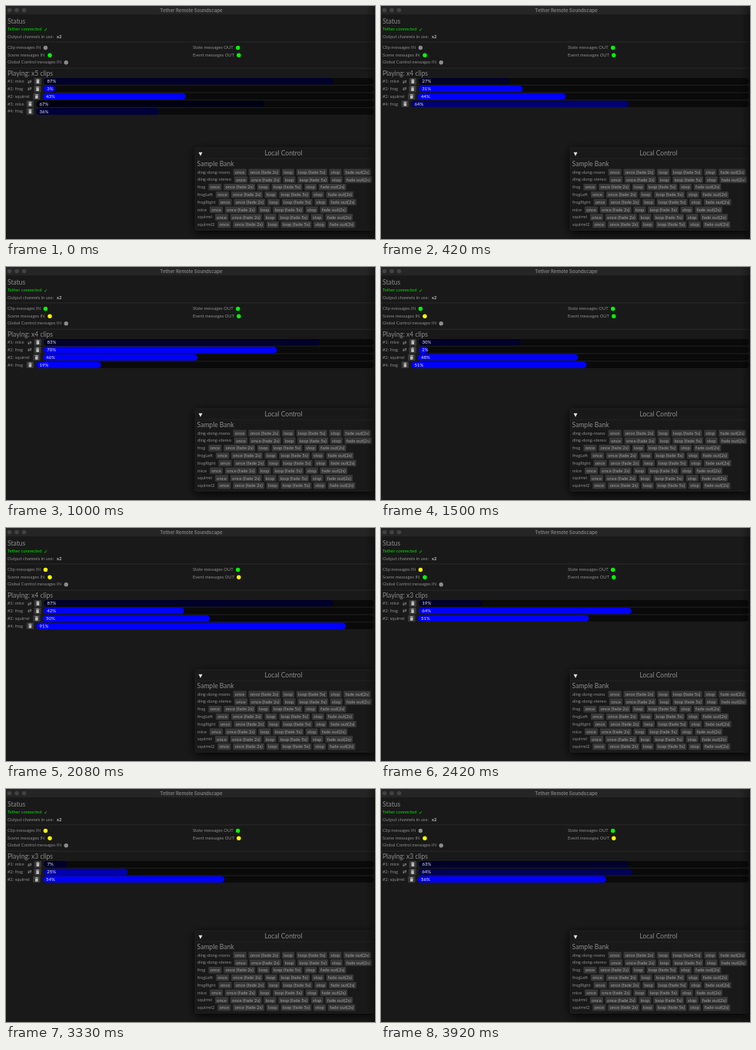
An HTML page with a canvas for the animation above (4010 ms loop, 480 by 304 pixels).

```html
<!DOCTYPE html>
<html lang="en">
<head>
<meta charset="utf-8">
<title>Tether Remote Soundscape</title>
<style>
  html, body { margin: 0; height: 100%; overflow: hidden; background: #191919; }
  canvas { display: block; }
</style>
</head>
<body>
<canvas id="stage" width="480" height="304"></canvas>
<script>
const ctx = document.getElementById('stage').getContext('2d');
const LOOP = 4010, TICKS = 48, TICKS_PER_MS = 0.012;
const ROW = 9.8, BAR_END = 478.7;
const BODY = '6px Lato, sans-serif', LABEL = '5.8px Lato, sans-serif';
const HEADING = '8.5px Lato, sans-serif', SYMBOL = '6.5px "DejaVu Sans", sans-serif';
const BACK = '#191919', BUTTON = '#383838', EDGE = '#2a2a2a', RULE = '#363636', DIM = '#8c8c8c';
const GREY = '#8c8c8c', GREEN = '#0f0', YELLOW = '#ff0';

// keys: [tick, percent], unwrapped for looping clips; blue: brightness at a tick
const clips = [
  { name: '#1: mice', x: 49.3, loop: true, blue: () => 42,
    keys: [[0, 87.7], [5, 127.8], [12, 183.6], [18, 230.8], [25, 287.6], [34, 358.5], [47, 463.6]] },
  { name: '#2: frog', x: 49, loop: true, blue: k => 255 - Math.max(0, k - 34) * 13,
    keys: [[0, 3.4], [5, 31.5], [12, 70.6], [18, 102.8], [25, 142.5], [34, 191.8], [47, 264.7]] },
  { name: '#2: squirrel', x: 47.7, blue: () => 255, keys: [[0, 43.2], [47, 56.9]] },
  { name: '#3: mice', x: 39.3, blue: () => 20, keys: [[0, 67.6], [4, 99.6]] },
  { name: '#4: frog', x: 39.3, blue: k => 58 + k * 11, keys: [[0, 36.4], [5, 64.4]] },
  { name: '#4: frog', x: 39.3, blue: () => 255, keys: [[9, 2.6], [12, 19.2], [18, 51.9], [25, 91.7]] }
];

const lights = [
  { text: 'Clip messages IN', x: 2, y: 54.5, dot: 51.4, steps: [[0, GREY], [10, GREEN], [20, YELLOW], [44, GREY]] },
  { text: 'Scene messages IN', x: 2, y: 64.2, dot: 57, steps: [[0, GREEN], [10, YELLOW], [26, GREEN], [38, YELLOW]] },
  { text: 'Global Control messages IN', x: 2, y: 73.8, dot: 78.2, steps: [[0, GREY]] },
  { text: 'State messages OUT', x: 243, y: 54.5, dot: 301.7, steps: [[0, GREEN]] },
  { text: 'Event messages OUT', x: 243, y: 64.2, dot: 302.8, steps: [[0, GREEN], [23, YELLOW], [27, GREEN], [38, YELLOW]] }
];

const samples = ['ding-dong-mono', 'ding-dong-stereo', 'frog', 'frogLeft', 'frogRight', 'mice', 'squirrel', 'squirrel2'];
const actions = ['once', 'once (fade 2s)', 'loop', 'loop (fade 5s)', 'stop', 'fade out(2s)'];

// Draws text centred vertically on y and returns its width.
function text(str, x, y, color = DIM, font = LABEL, align = 'left') {
  ctx.font = font;
  ctx.fillStyle = color;
  ctx.textAlign = align;
  ctx.fillText(str, x, y + parseFloat(font.match(/[\d.]+px/)[0]) * 0.34);
  return ctx.measureText(str).width;
}

function box(x, y, w, h, radius, fill) {
  ctx.beginPath();
  ctx.roundRect(x, y, w, h, radius);
  ctx.fillStyle = fill;
  ctx.fill();
}

function dot(x, y, r, fill) {
  box(x - r, y - r, 2 * r, 2 * r, r, fill);
}

function line(y, color = RULE, x = 0, end = 480) {
  ctx.fillStyle = color;
  ctx.fillRect(x, y, end - x, 0.6);
}

function progress({ keys }, tick) {
  let i = 1;
  while (i < keys.length - 1 && keys[i][0] <= tick) i++;
  const [t0, v0] = keys[i - 1], [t1, v1] = keys[i];
  return v0 + (v1 - v0) * (tick - t0) / (t1 - t0);
}

function drawTrash(x, y) {
  box(x, y - 4.4, 9.4, 8.8, 1, BUTTON);
  box(x + 2.5, y - 2.4, 4.4, 0.8, 0, '#c8c8c8');
  box(x + 3.9, y - 3, 1.6, 0.7, 0, '#c8c8c8');
  box(x + 2.9, y - 1.2, 3.6, 4, 0.5, '#bebebe');
}

function drawClip(clip, y, tick) {
  const value = progress(clip, tick) % 100, width = BAR_END - clip.x;
  text(clip.name, 2, y);
  if (clip.loop) text('⇄', 28, y, '#a0a0a0', SYMBOL);
  drawTrash(clip.x - 12.6, y);
  box(clip.x, y - 4.2, width, 8.4, 4.2, '#0a0a0a');
  box(clip.x, y - 4.2, Math.max(8.4, width * value / 100), 8.4, 4.2, `rgb(0 0 ${clip.blue(tick)})`);
  text(Math.floor(value) + '%', clip.x + 4.3, y, '#f0f0f0', BODY);
}

function drawStatus(tick) {
  text('Status', 2, 20, DIM, HEADING);
  const width = text('Tether connected', 2, 30.5, '#00e000');
  text('✓', 4.5 + width, 30.5, '#00e000', SYMBOL);
  text('Output channels in use:', 2, 40.3);
  text('x2', 66, 40.3, '#f0f0f0', BODY);
  line(46.6);
  for (const { text: label, x, y, dot: dotX, steps } of lights) {
    text(label, x, y - 0.3);
    dot(dotX, y, 2.7, steps.findLast(step => step[0] <= tick)[1]);
  }
  line(80.8);
}

function drawTitleBar() {
  box(0, 0, 480, 11, 0, '#252525');
  for (const x of [4.5, 14, 23.5]) dot(x, 5.5, 2.8, '#424242');
  text('Tether Remote Soundscape', 241, 5.5, '#808080', '600 6.1px Inter, sans-serif', 'center');
}

function drawPanel() {
  ctx.save();
  ctx.shadowColor = '#000';
  ctx.shadowBlur = 14;
  ctx.shadowOffsetY = 3;
  box(246, 185, 232, 107.5, 3, BACK);
  ctx.restore();
  ctx.strokeStyle = EDGE;
  ctx.lineWidth = 0.6;
  ctx.stroke();
  line(198.8, EDGE, 246, 478);
  text('▼', 250.5, 192.3, '#e0e0e0', SYMBOL);
  text('Local Control', 361, 192.3, DIM, HEADING, 'center');
  text('Sample Bank', 248.6, 206.5, DIM, HEADING);
  samples.forEach((name, i) => {
    const y = 216.7 + i * ROW;
    let x = 255.2 + text(name, 249, y);
    for (const action of actions) {
      ctx.font = BODY;
      box(x - 2.2, y - 4.2, ctx.measureText(action).width + 4.4, 8.4, 1, BUTTON);
      x += text(action, x, y, '#a4a4a4', BODY) + 7.2;
    }
  });
}

function draw(tick) {
  ctx.fillStyle = BACK;
  ctx.fillRect(0, 0, 480, 304);
  drawTitleBar();
  drawStatus(tick);
  const playing = clips.filter(clip =>
    tick >= clip.keys[0][0] && (clip.loop || progress(clip, tick) < 100));
  text(`Playing: x${playing.length} clips`, 2, 87.8, DIM, HEADING);
  playing.forEach((clip, i) => drawClip(clip, 98.3 + i * ROW, tick));
  drawPanel();
  const shade = ctx.createLinearGradient(468, 0, 480, 0);
  shade.addColorStop(0, '#0000');
  shade.addColorStop(1, '#0005');
  ctx.fillStyle = shade;
  ctx.fillRect(468, 0, 12, 304);
}

function frame() {
  const time = performance.now() % LOOP;
  draw(Math.min(TICKS - 1, Math.floor((time + 4) * TICKS_PER_MS)));
  requestAnimationFrame(frame);
}
frame();
</script>
</body>
</html>
```
